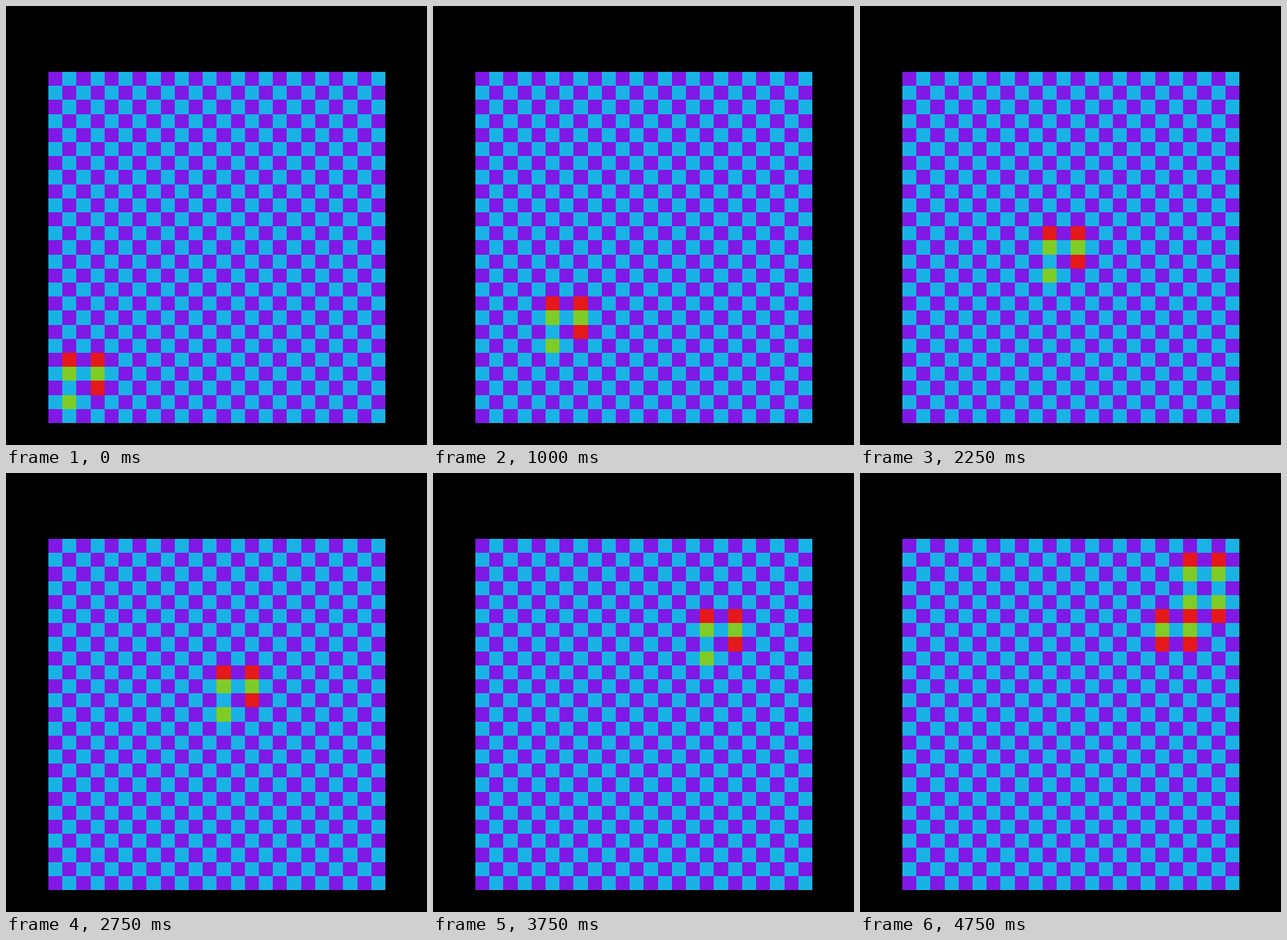
An HTML page with a canvas for the animation above (5 s loop, 576x600 px).

```html
<!DOCTYPE html>
<html lang="en">
<head>
<meta charset="utf-8">
<title>Glider on a checkerboard</title>
<style>
  html, body { margin: 0; width: 100%; height: 100%; overflow: hidden; background: #000; }
  canvas { display: block; }
</style>
</head>
<body>
<canvas id="stage" width="576" height="600"></canvas>
<script>
const canvas = document.getElementById('stage');
const ctx = canvas.getContext('2d');
const COLS = 24, ROWS = 25, STEP_MS = 250, STEPS = 20;

// Even and odd squares of the checkerboard
const REST = ['#8019e5', '#19b2e5'];
const LIVE = ['#7fcc26', '#e51919'];

// Cell edges snapped to whole pixels; the tiny skew settles exact ties
const edgeX = col => Math.ceil(57.598 + 19.2001 * col);
const edgeY = row => Math.round(90 + 19.2 * row);

// Two columns with a gap between them: side is 0 on the left, 1 on the right
const sideOf = dx => dx === 0 || dx === 2 ? dx / 2 : -1;

// Full rows on top, then one cell on each side along a diagonal
function inGlider(dx, dy) {
  const side = sideOf(dx);
  return side >= 0 && dy >= 0 && (dy < 2 || dy + side === 3);
}

// Two overlapping column pairs, the upper one broken in the middle
function inBurst(dx, dy) {
  const upper = sideOf(dx) >= 0 && dy >= 0 && dy < 5 && dy !== 2;
  const lower = sideOf(dx + 2) >= 0 && dy >= 4 && dy < 7;
  return upper || lower;
}

function draw(step) {
  const isLive = step < STEPS - 1 ? inGlider : inBurst;
  const left = 1 + step, top = 20 - step;
  ctx.clearRect(0, 0, canvas.width, canvas.height);
  for (let row = 0; row < ROWS; row++) {
    for (let col = 0; col < COLS; col++) {
      const colors = isLive(col - left, row - top) ? LIVE : REST;
      const x = edgeX(col), y = edgeY(row);
      ctx.fillStyle = colors[(col + row) % 2];
      ctx.fillRect(x, y, edgeX(col + 1) - x, edgeY(row + 1) - y);
    }
  }
}

const start = performance.now();
function tick() {
  const elapsed = performance.now() - start;
  draw(Math.floor(elapsed / STEP_MS) % STEPS);
  requestAnimationFrame(tick);
}
tick();
</script>
</body>
</html>
```
